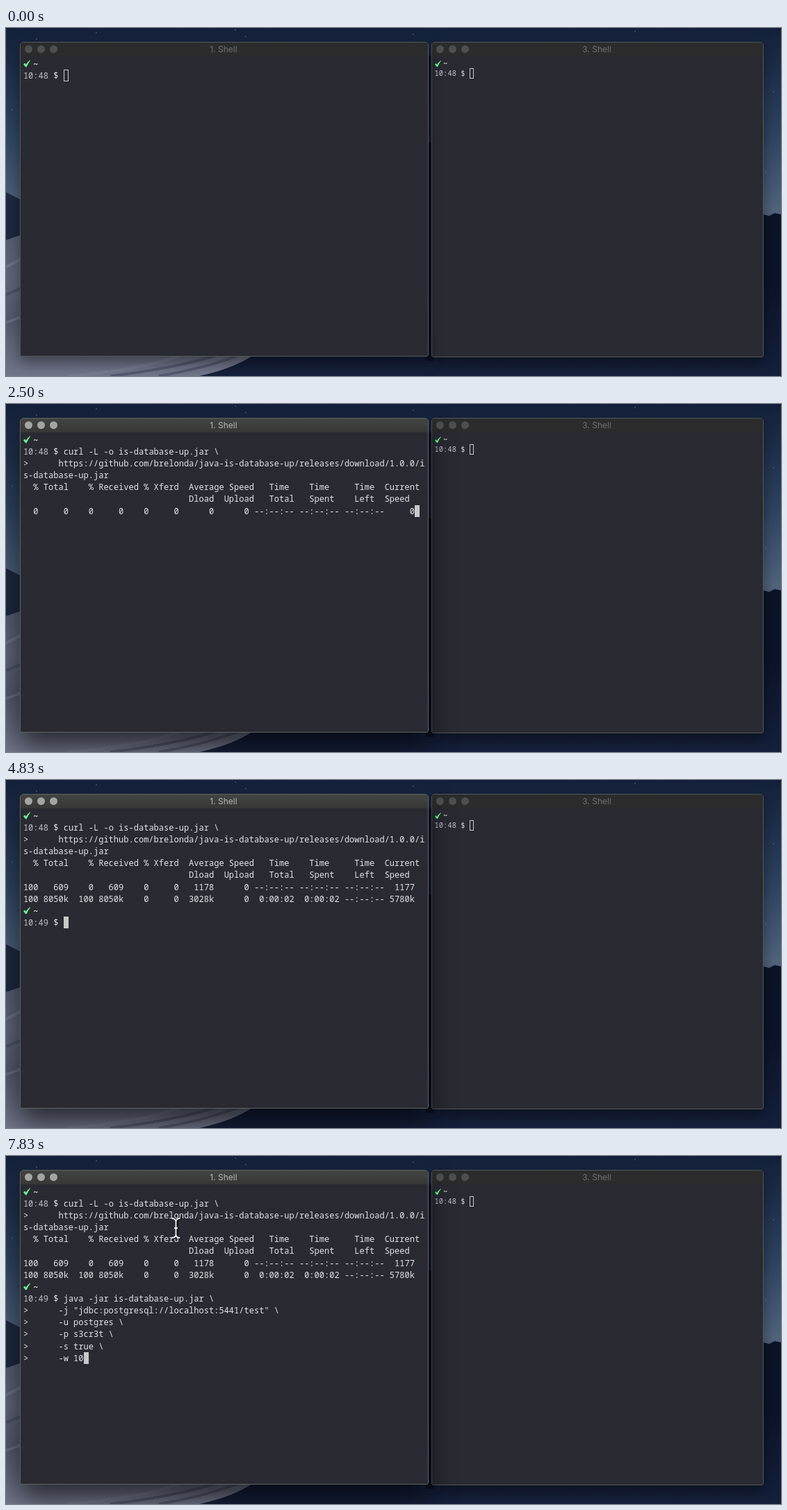
Animation of 1115 by 502 pixels, one loop 8000 ms. Source, as an HTML page:

```html
<!DOCTYPE html>
<html lang="en">
<head>
<meta charset="utf-8">
<title>Shell session</title>
<style>
html, body { margin: 0; width: 100%; height: 100%; overflow: hidden; background: #131e3a; }
#stage { position: absolute; left: 0; top: 0; width: 1115px; height: 502px; overflow: hidden; }
#desk, #beam { position: absolute; left: 0; top: 0; overflow: visible; }
.win {
  position: absolute; top: 20px; box-sizing: border-box;
  border: 1px solid #55575a; border-radius: 5px 5px 3px 3px;
  background: #2a2a33; box-shadow: 0 9px 20px rgba(0, 0, 0, .4);
}
#left { left: 20px; width: 588px; height: 454px; }
#right { left: 612px; width: 478px; height: 455px; }
.bar {
  height: 20px; border-radius: 4px 4px 0 0; background: #2b2c2b;
  font: 12px/19px Inter, "Liberation Sans", sans-serif; text-align: center; color: #707171;
}
.bar span { position: relative; left: -1px; }
.bar i { position: absolute; top: 4px; width: 11px; height: 11px; border-radius: 50%; background: #4e504f; }
.active { box-shadow: 0 20px 38px rgba(0, 0, 0, .6); border-color: #606264; }
.active .bar { background: linear-gradient(#444542, #373835); color: #b7b8b7; }
.active .bar i { background: #a3a4a3; }
.screen { position: absolute; font-family: "Noto Sans Mono", "DejaVu Sans Mono", monospace; color: #e4e4e7; }
#left .screen { left: 3.9px; top: 21.7px; font-size: 12.04px; --row: 17.15px; }
#right .screen { left: 3.5px; top: 22.5px; font-size: 10.5px; --row: 14.85px; color: #d3d3d7; }
.row { position: absolute; left: 0; height: var(--row); line-height: var(--row); white-space: pre; }
.time { color: #c2c2c8; }
.home { color: #f1efc9; font-weight: 600; }
.row svg { position: absolute; left: 0; top: calc(var(--row) / 2 - .42em); width: .86em; height: .86em; fill: #6cf58d; }
.caret { position: absolute; width: 1ch; height: var(--row); box-sizing: border-box; border: 1px solid #c9c9cb; }
.active .caret { background: #c9c9cb; }
</style>
</head>
<body>
<div id="stage">
  <svg id="desk" width="1115" height="502">
    <defs>
      <linearGradient id="sky" x2="0" y2="1">
        <stop offset="0" stop-color="#14203a"/><stop offset=".3" stop-color="#2d435f"/>
        <stop offset=".52" stop-color="#50637c"/>
      </linearGradient>
      <linearGradient id="dune" x2="0" y2="1">
        <stop offset="0" stop-color="#565c72"/><stop offset=".3" stop-color="#5f6479"/>
        <stop offset=".6" stop-color="#53586d"/><stop offset="1" stop-color="#72768a"/>
      </linearGradient>
      <linearGradient id="night" x2="0" y2="1">
        <stop offset="0" stop-color="#0c1326"/><stop offset=".6" stop-color="#0c1429"/>
        <stop offset="1" stop-color="#15203c"/>
      </linearGradient>
    </defs>
    <rect width="1115" height="502" fill="url(#sky)"/>
    <g id="stars" fill="#c3cfdf"></g>
    <path d="M560 165H640L1085 268L1098 271L1106 267L1115 269V502H0V300L300 280Z" fill="url(#night)"/>
    <rect x="604" y="40" width="12" height="440" fill="#080b14" opacity=".6"/>
    <path d="M0 237L10 242L20 247L60 270V320H0Z" fill="#1f2840"/>
    <path d="M0 306L20 299L120 310Q300 400 370 462Q335 490 278 502H0Z" fill="url(#dune)"/>
    <g fill="none" stroke-width="4">
      <path d="M0 345L24 332M0 425L24 416M90 502Q190 494 260 470" stroke="#7d8195" opacity=".5"/>
      <path d="M0 385L24 374M150 502Q240 492 310 470M220 502Q290 490 335 472" stroke="#3a4056" opacity=".5"/>
    </g>
  </svg>
  <div id="right" class="win"></div>
  <div id="left" class="win"></div>
  <svg id="beam" width="1" height="1" fill="none">
    <path id="ibeam" d="M-6-14C-2-14 0-12 0-9V9C0 12-2 14-6 14M6-14C2-14 0-12 0-9M0 9C0 12 2 14 6 14M-2.5 0H2.5"/>
    <use href="#ibeam" x="1.5" y=".5" stroke="#08090c" stroke-width="2.4"/>
    <use href="#ibeam" x="-.5" stroke="#f4f4f5" stroke-width="1.8"/>
  </svg>
</div>
<script>
const LOOP = 8000;
const $ = id => document.getElementById(id);
const left = $("left"), right = $("right"), beam = $("beam");

const CHECK = '<svg viewBox="0 0 10 10"><path d="M0 6L2 4.4L3.5 6.4Q6 2.4 9.6 0L10 .5Q6.6 4.4 4.4 10H3Z"/></svg>';
const home = `${CHECK}<span class="home">  ~</span>`;
const prompt = (time, text = "") => `<span class="time">${time}</span> $ ${text}`;
const more = text => "&gt;      " + text;

// One progress line in curl's column layout.
const WIDTHS = [3, 6, 5, 6, 5, 6, 7, 7, 9, 9, 9, 6];
const meter = text => text.split(" ").map((s, i) => s.padStart(WIDTHS[i])).join("");
const NONE = "--:--:--";
const idle = `${NONE} ${NONE} ${NONE}`;

const start = [home, prompt("10:48")];
const command = [
  home,
  prompt("10:48", "curl -L -o is-database-up.jar \\"),
  more("https://github.com/brelonda/java-is-database-up/releases/download/1.0.0/i"),
  "s-database-up.jar"
];
const header = [
  ...command,
  "  % Total    % Received % Xferd  Average Speed   Time    Time     Time  Current",
  "                                 Dload  Upload   Total   Spent    Left  Speed"
];
const waiting = [...header, meter(`0 0 0 0 0 0 0 0 ${idle} 0`)];
const redirected = [...header, meter(`100 609 0 609 0 0 1178 0 ${idle} 1177`)];
const slow = [...redirected, meter("0 8050k 0 51787 0 0 40657 0 0:03:22 0:00:01 0:03:21 40657")];
const fast = [...redirected, meter("48 8050k 48 3911k 0 0 1885k 0 0:00:04 0:00:02 0:00:02 3230k")];
const loaded = [...redirected, meter(`100 8050k 100 8050k 0 0 3028k 0 0:00:02 0:00:02 ${NONE} 5780k`), home];
const done = [...loaded, prompt("10:49")];
const launch = [
  ...loaded,
  prompt("10:49", "java -jar is-database-up.jar \\"),
  more('-j "jdbc:postgresql://localhost:5441/test" \\'),
  more("-u postgres \\"),
  more("-p s3cr3t \\"),
  more("-s true \\"),
  more("-w 10")
];

// time, active, rows, caret [column, row], pointer [x, y]
const steps = [
  [0, false, start, [8, 1]],
  [500, false, start, [8, 1], [371, 187]],
  [830, true, start, [8, 1], [348, 185]],
  [1160, true, start, [8, 1], [342, 186]],
  [1500, true, command, [17, 3], [340, 187]],
  [2160, true, command, [0, 4]],
  [2500, true, waiting, [78, 6]],
  [2830, true, redirected, [0, 7]],
  [3160, true, redirected, [0, 7], [330, 191]],
  [3500, true, slow, [78, 7], [330, 191]],
  [3830, true, slow, [78, 7], [335, 190]],
  [4160, true, slow, [78, 7]],
  [4500, true, fast, [78, 7]],
  [4830, true, done, [8, 9]],
  [5830, false, done, [8, 9]],
  [7160, true, done, [8, 9], [245, 104]],
  [7830, true, launch, [12, 14], [245, 104]]
];

function frame(win, title) {
  const dots = [6, 24, 42].map(x => `<i style="left:${x}px"></i>`).join("");
  win.innerHTML = `<div class="bar">${dots}<span>${title}</span></div><div class="screen"></div>`;
}

function write(win, rows, [col, line]) {
  const top = n => `top:calc(var(--row) * ${n})`;
  win.querySelector(".screen").innerHTML =
    `<div class="caret" style="left:${col}ch;${top(line)}"></div>` +
    rows.map((text, n) => `<div class="row" style="${top(n)}">${text}</div>`).join("");
}

function show([, active, rows, caret, pointer]) {
  left.classList.toggle("active", active);
  write(left, rows, caret);
  beam.style.display = pointer ? "block" : "none";
  if (pointer) beam.style.transform = `translate(${pointer[0]}px, ${pointer[1]}px)`;
}

$("stars").innerHTML = [[44, 16], [345, 12], [330, 3], [130, 7], [586, 9], [905, 5], [1093, 208], [1104, 92], [9, 118]]
  .map(([x, y]) => `<circle cx="${x}" cy="${y}" r=".7" opacity=".6"/>`).join("");

frame(left, "1. Shell");
frame(right, "3. Shell");
write(right, start, [8, 1]);

let current;
function tick() {
  const t = performance.now() % LOOP;
  const step = steps.findLast(s => s[0] <= t);
  if (step !== current) show(current = step);
  requestAnimationFrame(tick);
}
tick();
</script>
</body>
</html>
```
